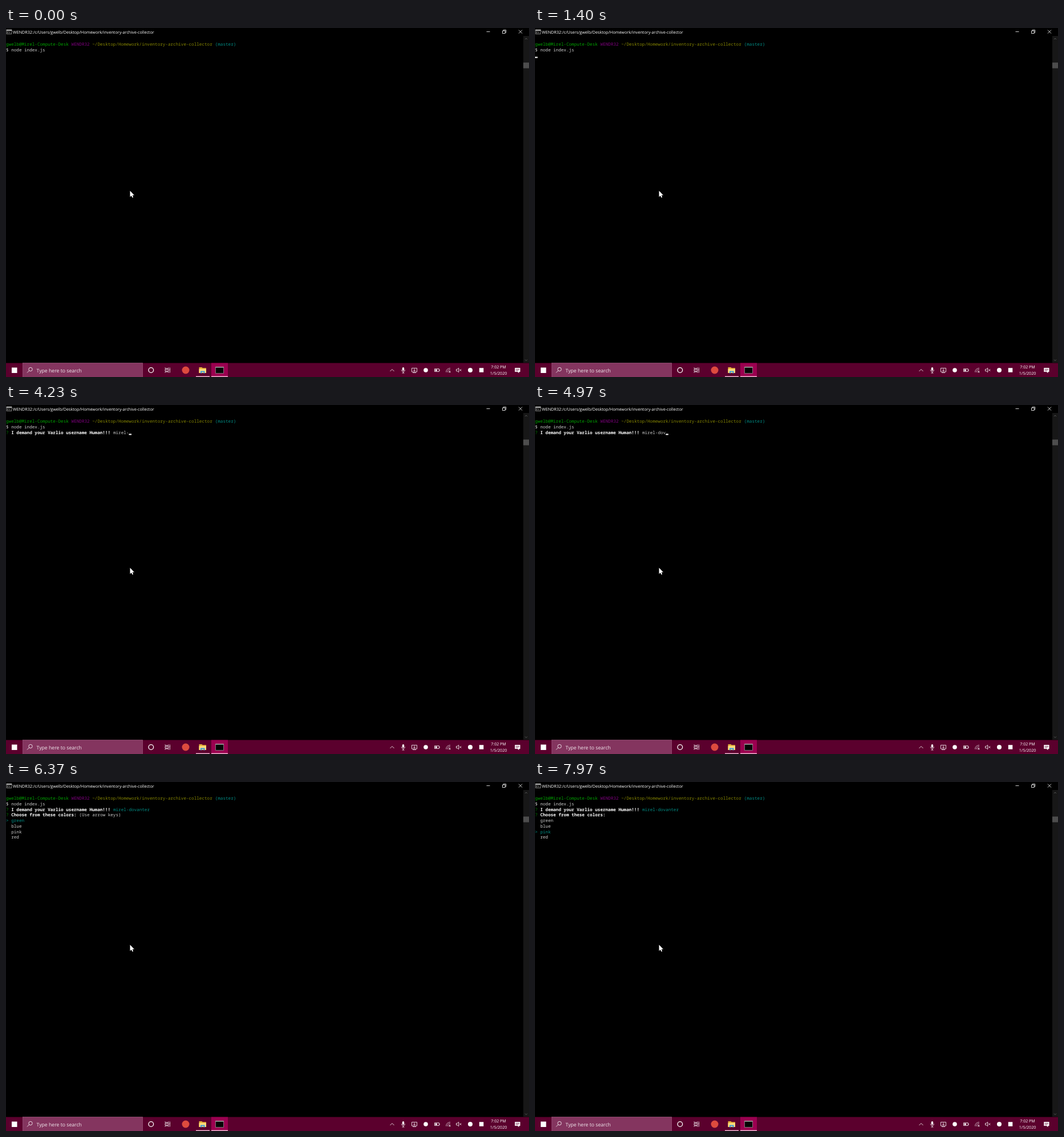
Write an HTML page that moves like this. It is 917 by 611 pixels and loops after 8 s.

```html
<!DOCTYPE html>
<html lang="en">
<head>
<meta charset="utf-8">
<title>Terminal prompt</title>
<style>
  html, body { margin: 0; width: 100%; height: 100%; overflow: hidden; background: #000; }
  svg { display: block; width: 100vw; height: 100vh; text-rendering: geometricPrecision; }
  text { white-space: pre; }
  .ui { font-family: "Open Sans", sans-serif; fill: #fff; }
  #console { font: 7.64px "Noto Sans Mono", monospace; }
  .line { fill: none; stroke: #fff; stroke-width: .8; }
</style>
</head>
<body>
<svg viewBox="0 0 917 611">
  <rect width="917" height="611"/>

  <!-- title bar -->
  <rect x="1" y="3" width="9" height="7.5" fill="#111" stroke="#aaa" stroke-width=".7"/>
  <path d="M1 4H10" stroke="#ddd" stroke-width="1.4"/>
  <text class="ui" x="2" y="9.2" font-size="4">C:\</text>
  <text class="ui" x="12" y="9.7" font-size="7.2">WENDR32:/c/Users/gwelb/Desktop/Homework/inventory-archive-collector</text>
  <path class="line" d="M842.5 6.5H848.5M870.5 5H875.2V9.5H870.5ZM872 5V3.5H876.7V8H875.2M899 3.5L905 9.5M905 3.5L899 9.5"/>

  <!-- scroll bar -->
  <rect x="907" y="14" width="10" height="572" fill="#171717"/>
  <rect x="907" y="60.5" width="10" height="10" fill="#4d4d4d"/>
  <path d="M910 20L912 18L914 20M910 580.5L912 582.5L914 580.5" fill="none" stroke="#666" stroke-width=".8"/>

  <g id="console"></g>

  <!-- taskbar -->
  <rect y="586.5" width="917" height="24.5" fill="#5b002d"/>
  <rect x="10" y="594.5" width="9.5" height="9.5" fill="#fff"/>
  <rect x="29.5" y="586.5" width="210" height="25" fill="#84355f" stroke="#9b5a7d" stroke-width=".7"/>
  <circle class="line" cx="43" cy="597.5" r="3.2"/>
  <path class="line" d="M40.7 599.8L37 603.5"/>
  <text class="ui" x="53.5" y="602.6" font-size="8.7" fill-opacity=".9">Type here to search</text>
  <circle cx="254.3" cy="599" r="4.3" fill="none" stroke="#fff" stroke-width="1.3"/>
  <path class="line" d="M279 594.5V596H285V594.5M279 603.5V602H285V603.5M279 597.5H285V600.5H279ZM287.3 594.5V603.5M286.6 598H288"/>
  <circle cx="315" cy="599" r="6.5" fill="#dd4b3e"/>
  <path d="M338.5 594H343.5L344.7 595.3H351V604H338.5Z" fill="#e8b33c"/>
  <path d="M338.5 597H351V604H338.5Z" fill="#ffdc7c"/>
  <path d="M341 604.5V600.5H348.5V604.5H346.5V602.5H343V604.5Z" fill="#3c9cdc"/>
  <rect x="360" y="586.5" width="29" height="24.5" fill="#9b0050"/>
  <rect x="367.5" y="593.5" width="14" height="11" fill="#050505" stroke="#8c8c8c" stroke-width=".8"/>
  <path d="M367.5 594H381.5" stroke="#ccc"/>
  <path d="M333 610.2H357M360 610.2H389" stroke="#f0b4d0" stroke-width="1.6"/>

  <!-- tray -->
  <path class="line" d="M673.5 601L677 597.5L680.5 601"/>
  <rect x="694.8" y="594" width="3.4" height="6" rx="1.7" fill="#fff"/>
  <path class="line" d="M693.4 598.5Q693.6 601.5 696.5 601.5T699.6 598.5M696.5 601.5V604M694.5 604H698.5"/>
  <path class="line" d="M711.5 595.5H720.5V602H711.5ZM716 596.5V600.5M714.3 599L716 600.7L717.7 599M713 603.5H719"/>
  <circle cx="736" cy="599" r="3.8" fill="#fff"/>
  <path class="line" d="M751.5 596.7H759.3V601.5H751.5ZM760.2 598V600.3"/>
  <rect x="752.5" y="597.7" width="3.5" height="2.8" fill="#fff"/>
  <path class="line" d="M771.5 602.5Q772 596 779 595.5M773.7 602.8Q774 598.3 779 597.8M776 603Q776.2 600.4 779 600.2" opacity=".8"/>
  <circle cx="778.3" cy="602.3" r="1" fill="#fff"/>
  <path class="line" d="M789.5 597.5H791.2L793.7 595.3V602.7L791.2 600.5H789.5ZM795.3 597.5L798.3 600.5M798.3 597.5L795.3 600.5"/>
  <circle cx="814" cy="599" r="4" fill="#fff"/>
  <rect x="829.8" y="595.2" width="7.5" height="7.5" fill="#fff"/>
  <g class="ui" font-size="7.1" text-anchor="middle">
    <text x="863.5" y="596.2">7:02 PM</text>
    <text x="863.5" y="607">1/5/2020</text>
  </g>
  <path d="M892.3 595H901.5V602H899.5V604.3L897 602H892.3Z" fill="#fff"/>
  <path d="M893.8 597H900M893.8 598.6H900M893.8 600.2H898" stroke="#5b002d" stroke-width=".6"/>

  <!-- mouse pointer -->
  <path d="M217.5 285V295.8L219.9 293.5L221.4 297L223.2 296.2L221.7 292.8H224.9Z" fill="#fff"/>
</svg>

<script>
const LOOP = 8000, CHAR = 4.584, ROW = 9.77, BASELINE = 31;
const GREY = "#c8c8c8", WHITE = "#fff", GREEN = "#00a000", CYAN = "#008c84";
const QUESTION = "I demand your Varlio username Human!!!";
const ANSWER = "mirel-dovanter";
const CHOICES = ["green", "blue", "pink", "red"];
const ANSWER_COL = QUESTION.length + 3;
const KEY_TIMES = [3300, 3450, 3570, 3800, 4000, 4200, 4430, 4640, 4840, 5000, 5190, 5350, 5500, 5650];
const ASKED = 2700, ENTERED = 6000, FIRST_DOWN = 7550, SECOND_DOWN = 7800;
const CURSOR_ON = [[270, 800], [1400, 1900], [2500, 2970], [3300, ENTERED]];

const group = document.getElementById("console");
let shown = "";

const put = (row, col, text, color, weight = 400) =>
  `<text x="${col * CHAR}" y="${BASELINE + row * ROW}" fill="${color}" font-weight="${weight}">${text}</text>`;

const cursor = col =>
  `<rect x="${col * CHAR}" y="50.4" width="${CHAR}" height="2.1" fill="#fff"/>`;

const ask = (row, text) => put(row, 0, "?", "#008000") + put(row, 2, text, WHITE, 600);

const header =
  put(0, 0, "gwelb@Mirel-Compute-Desk", GREEN) +
  put(0, 25, "WENDR32", "#800080") +
  put(0, 33, "~/Desktop/Homework/inventory-archive-collector", "#858500") +
  put(0, 80, "(master)", CYAN) +
  put(1, 0, "$ node index.js", GREY);

function menu(t) {
  const selected = (t >= FIRST_DOWN) + (t >= SECOND_DOWN);
  const hint = selected ? "" : put(3, 28, "(Use arrow keys)", GREY);
  const options = CHOICES.map((name, i) => i === selected
    ? put(4 + i, 0, "&gt;", CYAN) + put(4 + i, 2, name, CYAN)
    : put(4 + i, 2, name, GREY));
  return ask(3, "Choose from these colors:") + hint + options.join("");
}

function screen(t) {
  let out = header;
  const typed = KEY_TIMES.filter(k => t >= k).length;
  if (t >= ASKED) {
    out += ask(2, QUESTION);
    out += put(2, ANSWER_COL, ANSWER.slice(0, typed), t < ENTERED ? GREY : CYAN);
  }
  if (t >= ENTERED) out += menu(t);
  if (CURSOR_ON.some(([from, to]) => t >= from && t < to))
    out += cursor(t < ASKED ? 0 : ANSWER_COL + typed);
  return out;
}

function frame() {
  const next = screen(performance.now() % LOOP);
  if (next !== shown) group.innerHTML = shown = next;
  requestAnimationFrame(frame);
}
frame();
</script>
</body>
</html>
```
